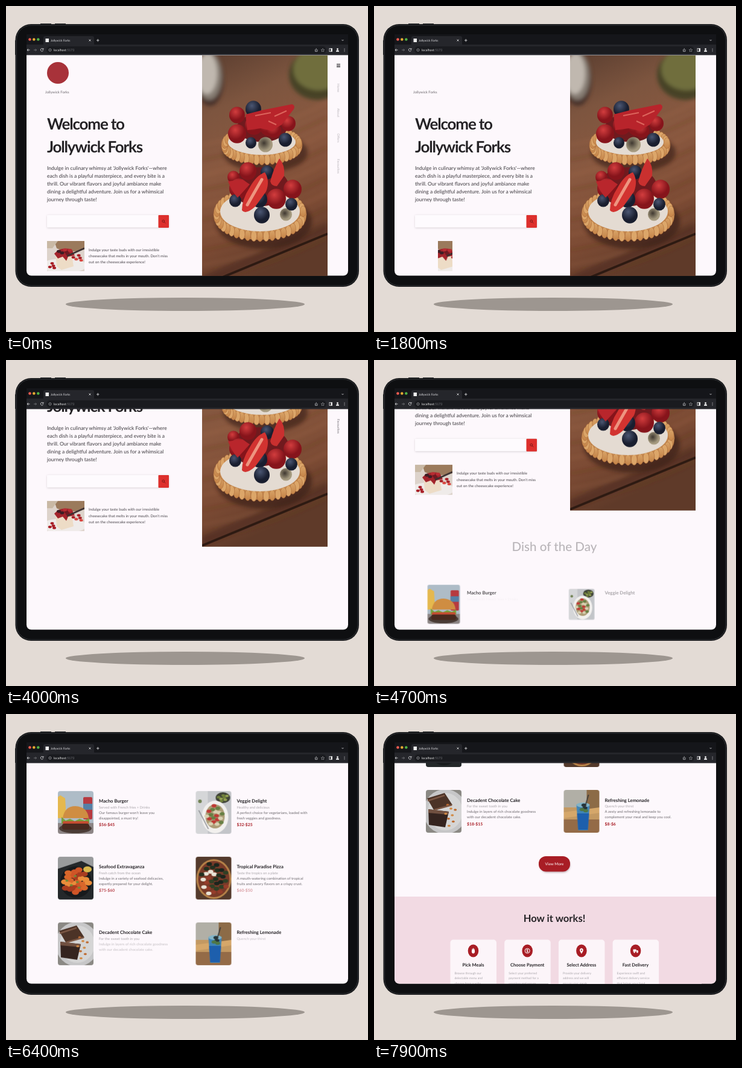
An HTML page that plays this animation: 600 by 541 pixels, repeating every 8 s.

```html
<!DOCTYPE html>
<html lang="en">
<head>
<meta charset="utf-8">
<title>Restaurant page on a tablet</title>
<style>
html, body { margin: 0; width: 100%; height: 100%; overflow: hidden; background: #e3dbd5; }
svg { display: block; width: 100%; height: 100%; }
text { font-family: Lato, "Open Sans", sans-serif; white-space: pre; text-rendering: geometricPrecision; }

.page { animation: scroll 8s linear infinite; }
.logo { animation: logo 8s linear infinite; }
.caption { animation: caption 8s linear infinite; }
.nav { animation: nav 8s linear infinite; }
.slit { animation: slit 8s linear infinite; transform-origin: 130px 0; }
.slide { animation: slide 8s linear infinite; }
/* hidden for two seconds, then shown from --at on */
.appear, .grow { animation: appear 8s linear infinite; animation-delay: calc(var(--at) - 10s); }
.grow { animation-name: grow; }

@keyframes scroll {
  0%, 42% { transform: translateY(0); }
  50% { transform: translateY(-156px); }
  58.75% { transform: translateY(-216px); }
  80% { transform: translateY(-458px); }
  98.75%, 100% { transform: translateY(-678px); }
}
@keyframes logo { 0%, 21.24% { opacity: 1; } 21.25%, 24% { opacity: 0; } 29%, 100% { opacity: 1; } }
@keyframes caption { 0%, 21.24% { opacity: 1; } 21.25%, 25% { opacity: 0; } 31%, 100% { opacity: 1; } }
@keyframes nav { 0% { opacity: .5; } 4%, 21.24% { opacity: 1; } 21.25%, 27% { opacity: 0; } 35%, 100% { opacity: 1; } }
@keyframes slit { 0%, 21.24% { transform: scaleX(1); } 21.25% { transform: scaleX(0); } 24.6%, 100% { transform: scaleX(1); } }
@keyframes slide { 0%, 21.24% { transform: none; } 21.25% { transform: translateX(31px); } 24.6%, 100% { transform: translateX(0); } }
@keyframes appear {
  0% { opacity: 0; }
  25% { opacity: 0; animation-timing-function: ease-out; }
  30%, 100% { opacity: 1; }
}
@keyframes grow {
  0%, 25% { visibility: hidden; transform: scale(.5); animation-timing-function: ease-out; }
  30%, 100% { visibility: visible; transform: scale(1); }
}
</style>
</head>
<body>
<svg viewBox="0 0 600 541" preserveAspectRatio="none">
  <defs>
    <clipPath id="screen"><rect x="34" y="60" width="533" height="387.500" rx="8"/></clipPath>
    <clipPath id="hero"><rect x="325" y="82" width="208" height="384"/></clipPath>
    <clipPath id="thumb"><rect class="slit" x="68" y="390" width="62" height="49.500"/></clipPath>
    <clipPath id="pic"><rect width="59" height="71" rx="4"/></clipPath>
    <linearGradient id="table" x2=".25" y2="1">
      <stop stop-color="#5b3e30"/><stop offset=".25" stop-color="#7d553f"/><stop offset=".5" stop-color="#8a5940"/>
      <stop offset=".8" stop-color="#7c4b34"/><stop offset="1" stop-color="#5f3a29"/>
    </linearGradient>
    <radialGradient id="red" cx=".4" cy=".3"><stop stop-color="#d23d3e"/><stop offset="1" stop-color="#86141b"/></radialGradient>
    <radialGradient id="blue" cx=".4" cy=".3"><stop stop-color="#4b5672"/><stop offset="1" stop-color="#191e2f"/></radialGradient>
    <radialGradient id="grey" cx=".4" cy=".4"><stop stop-color="#3f3830"/><stop offset="1" stop-color="#a59a7f"/></radialGradient>
    <linearGradient id="crust" x2="0" y2="1"><stop stop-color="#d9a468"/><stop offset="1" stop-color="#c68549"/></linearGradient>
    <filter id="soft" x="-30%" y="-30%" width="160%" height="160%"><feGaussianBlur stdDeviation="3"/></filter>
    <filter id="shade" x="-10%" y="-30%" width="120%" height="180%"><feGaussianBlur stdDeviation="1.4"/></filter>
    <filter id="lens"><feGaussianBlur stdDeviation=".7"/></filter>
  </defs>

  <rect width="600" height="541" fill="#e3dbd5"/>
  <ellipse cx="297" cy="495" rx="198" ry="11" fill="#9d9690"/>
  <path d="M57 30h18M81 30h18M16 57v24" stroke="#2c2e31" stroke-width="2"/>
  <rect x="15.500" y="30" width="569.500" height="436" rx="26" fill="#17181a"/>
  <rect x="17.500" y="32" width="565.500" height="432" rx="24" fill="#0e0f11" stroke="#393b3f" stroke-width=".8"/>

  <g clip-path="url(#screen)">
    <rect x="34" y="60" width="533" height="388" fill="#fdf8fc"/>
    <g class="page" id="page"></g>
  </g>

  <g id="chrome">
    <rect x="34" y="47" width="533" height="18" fill="#15161a"/>
    <rect x="34" y="64" width="533" height="17.500" fill="#25262b"/>
    <path d="M60 65q2 0 2-3v-9q0-3 3-3h78q3 0 3 3v9q0 3 2 3z" fill="#25262b"/>
    <circle cx="39.5" cy="55.5" r="2.3" fill="#ee5b50"/>
    <circle cx="46.3" cy="55.5" r="2.3" fill="#e6a932"/>
    <circle cx="53.3" cy="55.5" r="2.3" fill="#4fb046"/>
    <rect x="65.5" y="54" width="5.5" height="6" fill="#eee"/>
    <rect x="67" y="67" width="464" height="12" rx="6" fill="#1a1b1f"/>
    <g fill="none" stroke="#d4d4d6" stroke-width=".9">
      <path d="M137.500 55.500l3 3m0-3l-3 3M150 57h4.500m-2.250-2.250v4.500M556.500 56l1.500 1.500l1.500-1.500"/>
      <path d="M39.500 73h-4.500m2-2l-2 2l2 2"/>
      <path d="M46 73h4.500m-2-2l2 2l-2 2" stroke="#737478"/>
      <path d="M61.500 71.500a2.300 2.300 0 1 0 .3 2M62 70v2h-2"/>
      <circle cx="73" cy="73" r="2" stroke="#98999d"/>
      <path d="M512.500 72v3.500h3.500v-3.500M514.200 74v-4" stroke="#a5a6aa"/>
      <path d="M525 70.500l.8 1.800l2 .2l-1.500 1.300l.5 2l-1.800-1l-1.800 1l.5-2l-1.500-1.300l2-.2z" stroke="#a5a6aa" stroke-width=".6"/>
      <rect x="536" y="70.500" width="4.500" height="5"/>
    </g>
    <path d="M538.500 70.500h2v5h-2z" fill="#eee"/>
    <g fill="#e4e4e6">
      <circle cx="549.500" cy="71.500" r="1.400"/><path d="M547 76q0-3 2.500-3t2.500 3z"/>
      <circle cx="561" cy="71" r=".6"/><circle cx="561" cy="73" r=".6"/><circle cx="561" cy="75" r=".6"/>
    </g>
    <text x="74" y="58.700" font-size="4.900" fill="#e4e4e6">Jollywick Forks</text>
    <text x="79" y="74.800" font-size="5.300" fill="#eee">localhost<tspan fill="#77787d">:5173</tspan></text>
  </g>
</svg>

<script>
const BRAND = "Jollywick Forks";
const DARK = "#252326", GREY = "#6f6b70", PALE = "#aaa6ab", RED = "#a81d25";

const text = (x, y, size, str, color = DARK, more = "") =>
  `<text x="${x}" y="${y}" font-size="${size}" fill="${color}" ${more}>${str}</text>`;
const lines = (x, y, step, size, rows, color, more) =>
  rows.map((row, i) => text(x, y + i * step, size, row, color, more)).join("");
const oval = (x, y, rx, ry, fill, more = "") =>
  `<ellipse cx="${x}" cy="${y}" rx="${rx}" ry="${ry}" fill="${fill}" ${more}/>`;
const box = (x, y, w, h, fill, rx = 0, more = "") =>
  `<rect x="${x}" y="${y}" width="${w}" height="${h}" fill="${fill}" rx="${rx}" ${more}/>`;
const path = (d, fill, more = "") => `<path d="${d}" fill="${fill}" ${more}/>`;
const line = (d, stroke, width, more = "") =>
  `<path d="${d}" fill="none" stroke="${stroke}" stroke-width="${width}" ${more}/>`;
const appear = (at, body) => `<g class="appear" style="--at:${at}ms">${body}</g>`;
const BOLD = 'font-weight="700"', MID = 'text-anchor="middle"';

// scatter small ovals over a disc, golden-angle spacing
function scatter(n, x, y, rx, ry, size, colors) {
  let out = "";
  for (let i = 0; i < n; i++) {
    const r = Math.sqrt((i + .5) / n), a = i * 2.4;
    out += oval((x + rx * r * Math.cos(a)).toFixed(1), (y + ry * r * Math.sin(a)).toFixed(1),
      size, size * .7, colors[i % colors.length]);
  }
  return out;
}

// ridged crust: overlapping lobes around the rim
function rim(x, y, rx, ry, size) {
  let out = "";
  for (let i = 0; i < 44; i++) {
    const a = i / 44 * 2 * Math.PI;
    out += oval((x + rx * Math.cos(a)).toFixed(1), (y + ry * Math.sin(a)).toFixed(1),
      size * .55, size, i % 2 ? "url(#crust)" : "#dca669", 'stroke="#a8693a" stroke-width=".6"');
  }
  return out;
}

function tart(x, y, rx, ry, heap, berries) {
  const fruit = berries.map(([bx, by, r, kind]) => oval(bx, by, r, r * 1.05, `url(#${kind})`)).join("");
  return oval(x + 6, y + 12, rx + 3, ry, "#351d12", 'opacity=".6" filter="url(#soft)"')
    + oval(x, y, rx - 3, ry - 3, "#c88b50") + rim(x, y, rx - 5, ry - 9, 9)
    + oval(x, y - 5, rx - 11, ry - 12, "#e4dbd2")
    + oval(x, heap, rx * .62, ry * .72, "#701a1e") + fruit;
}

function heroPhoto() {
  let grain = "";
  for (let i = 0; i < 10; i++)
    grain += line(`M325 ${230 + i * 25}Q430 ${212 + i * 25} 533 ${160 + i * 25}`, i % 2 ? "#4f2e1e" : "#a8714f", 4, 'opacity=".25"');
  const back = [
    [410, 171, 13, "blue"], [383, 181, 13, "red"], [383, 212, 15, "red"], [411, 198, 15, "red"],
    [436, 199, 16, "red"], [468, 195, 12, "red"], [444, 206, 12, "red"],
    [406, 227, 9, "blue"], [430, 230, 12, "grey"], [463, 222, 11, "blue"]
  ];
  const front = [
    [377, 284, 10, "red"], [401, 274, 14, "red"], [386, 303, 16, "red"], [433, 276, 11, "blue"],
    [475, 304, 15, "red"], [448, 320, 16, "red"], [420, 321, 13, "blue"], [380, 323, 10, "blue"],
    [424, 347, 13, "blue"], [464, 346, 10, "grey"], [473, 329, 10, "blue"]
  ];
  return `<g clip-path="url(#hero)">` + box(325, 82, 208, 384, "url(#table)")
    + `<g filter="url(#soft)">` + grain
    + oval(338, 122, 23, 44, "#4a3329") + oval(337, 116, 21, 40, "#857b72") + oval(333, 112, 17, 34, "#c0b8af")
    + oval(516, 114, 47, 42, "#464325") + oval(518, 105, 42, 35, "#6f6e3c")
    + path("M325 448L533 358V376L325 466z", "#4b2b1d", 'opacity=".55"') + `</g>`
    + `<g filter="url(#lens)">` + line("M325 464L533 378", "#2d1a12", 4)
    + tart(424, 231, 67, 33, 202, back)
    + path("M397 180L424 173L474 163Q482 166 474 175L457 197L440 207L422 203L400 206z", "#b8242b")
    + line("M413 182l26 -5m6 6l20 -9m-30 17l13 6", "#dc655c", 2)
    + tart(421, 346, 77, 45, 300, front)
    + path("M453 253Q463 264 461 282L449 299Q440 299 438 291Q443 271 453 253z", "#c9302f")
    + path("M368 291L392 288L404 296L384 318Q374 308 368 291z", "#b9262c")
    + path("M429 276Q438 290 431 308L413 333Q397 347 391 339Q391 321 404 301Q415 281 429 276z", "#d23330")
    + line("M424 288Q413 307 400 330", "#ee9580", 5, 'stroke-linecap="round"')
    + `</g></g>`;
}

const cheesecake = box(68, 390, 62, 50, "#ddd3cb") + path("M80 390H130V404Q104 412 84 402z", "#9b7a5c")
  + path("M68 390h18l-9 12h-9z", "#c9b9a5") + oval(96, 431, 38, 12, "#efebe9")
  + path("M82 411L108 407L112 432L92 438L84 432z", "#eddcc6")
  + path("M80 411Q90 399 109 404L114 414L103 416L100 423L94 416L86 419z", "#a3232b")
  + scatter(6, 97, 408, 11, 5, 3.5, ["#6e1a22", "#3d1d24", "#b92d33"])
  + line("M130 402L110 411L101 415", "#3b3030", 2.5) + scatter(5, 120, 418, 9, 6, 3, [RED, "#d9453f"])
  + scatter(4, 76, 431, 7, 5, 3, [RED]);

function hero() {
  const nav = [["Home", 136], ["About", 177], ["Offers", 219], ["Favourites", 266]].map(([word, y]) =>
    text(0, 0, 5.4, word, "#77737a", `${MID} transform="translate(548.5 ${y}) rotate(90)"`)).join("");
  return heroPhoto()
    + `<g class="logo">` + oval(86, 111, 18, 18, "#a8323a") + line("M548 96.500h6m-6 2.200h6m-6 2.200h6", DARK, 1.1) + `</g>`
    + text(65, 144.5, 6, BRAND, GREY)
    + lines(68, 204.5, 38, 26, ["Welcome to", BRAND], DARK, `${BOLD} letter-spacing="-1.2"`)
    + lines(68, 272, 13, 8.5, [
      `Indulge in culinary whimsy at '${BRAND}'—where`,
      "each dish is a playful masterpiece, and every bite is a",
      "thrill. Our vibrant flavors and joyful ambiance make",
      "dining a delightful adventure. Join us for a whimsical",
      "journey through taste!"], "#3c393e")
    + box(68, 347.5, 202, 21, "#bdb6bc", 2, 'opacity=".6" filter="url(#shade)"')
    + box(68, 347, 186, 20.5, "#fefbfe", 1) + box(252.5, 347, 17.5, 21, "#dd302d", 1)
    + `<circle cx="260.800" cy="357" r="1.900" fill="none" stroke="#641616" stroke-width=".8"/>`
    + line("M262.200 358.500l2 2", "#641616", .9)
    + `<g clip-path="url(#thumb)"><g class="slide">${cheesecake}</g></g>`
    + `<g class="caption">` + lines(137, 406.5, 10.2, 6.2, [
      "Indulge your taste buds with our irresistible",
      "cheesecake that melts in your mouth. Don't miss",
      "out on the cheesecake experience!"], "#4a474c") + `</g>`
    + `<g class="nav">${nav}</g>`;
}

const photos = {
  burger: box(0, 0, 59, 71, "#aebcc7") + box(0, 53, 59, 18, "#8c8585") + path("M0 10l4-3l8 5l2 33H0z", "#e5b84e")
    + box(42, 10, 15, 37, "#b73a40", 2) + box(42, 21, 15, 10, "#5580a6")
    + oval(29, 62, 27, 8, "#4a3c36") + path("M8 45Q11 25 29 25Q49 26 51 45z", "#cf8d42")
    + path("M6 43l7 6l7-3l8 4l8-4l8 3l8-4v9H6z", "#76a13c") + box(8, 50, 43, 5, "#c64d32", 2) + box(7, 54, 45, 10, "#49291f", 4),
  veggie: box(0, 0, 59, 71, "#c3c5c9") + box(0, 0, 20, 71, "#d5d6d8") + oval(45, 11, 12, 9, "#404338") + scatter(7, 45, 11, 9, 6, 3, ["#71823c", "#93a052"])
    + oval(32, 43, 22, 27, "#f2f0ee") + oval(32, 42, 16, 20, "#ac9c76") + scatter(18, 32, 41, 14, 18, 4, ["#be3b35", "#678044", "#d8d1b2"])
    + line("M5 32l16 31", "#878a8f", 1.5) + oval(7, 17, 3, 3, "#708152"),
  seafood: box(0, 0, 59, 71, "#999b9c") + path("M0 20L39 7L59 17V71H0z", "#24282a") + oval(30, 42, 26, 26, "#171a1c")
    + scatter(24, 30, 41, 22, 20, 6, ["#d9672b", "#ea8d3b", "#a83c20", "#cf5527"]) + scatter(5, 28, 42, 14, 14, 2.5, ["#708a36"])
    + oval(49, 21, 7, 5, "#d9b84c"),
  pizza: box(0, 0, 59, 71, "#543a2c") + oval(30, 37, 29, 33, "#b78349") + oval(30, 37, 26, 30, "#783a29")
    + scatter(30, 30, 37, 23, 27, 4.5, ["#22301f", "#304025", "#eae4d7", "#1b251d", "#953d2b"]),
  cake: box(0, 0, 59, 71, "#8b8984") + oval(32, 36, 36, 37, "#c6c6c7") + oval(32, 36, 29, 31, "#d5d5d5")
    + path("M2 14L31 5L44 25L13 33z", "#4c3327") + path("M4 32L38 36L32 62L5 58z", "#35241f") + path("M4 32L38 36L37 41L4 38z", "#715040")
    + scatter(8, 41, 42, 11, 20, 2.5, ["#d18a45", "#bd6a30"]) + line("M3 18L31 9M14 33L43 25", "#7c5744", 2.5),
  lemonade: box(0, 0, 59, 71, "#c39962") + box(0, 0, 59, 29, "#b1afa6") + box(38, 0, 21, 36, "#8c6b47") + path("M0 49h59v22H0z", "#946b47")
    + path("M0 37L59 29V38L0 47z", "#d5a76a") + path("M21 24H43L40 67H24z", "#3f84b7") + path("M22 39H42L40 66H24z", "#1d5fad")
    + oval(32, 25, 11, 4, "#83b4c7") + scatter(4, 33, 30, 6, 6, 4, ["#25353a", "#4f7746"]) + line("M35 29L41 8", "#2f3235", 1.5)
};

function dish(pic, x, y, at, title, sub, desc, price) {
  const tx = x + 68, step = 240;
  return `<g class="grow" style="--at:${at}ms;transform-origin:${x + 29.5}px ${y + 35.5}px">`
    + `<g transform="translate(${x} ${y})" clip-path="url(#pic)">${photos[pic]}</g></g>`
    + appear(at + 20, text(tx, y + 19.5, 7.7, title, DARK, BOLD))
    + appear(at + step, text(tx, y + 29, 5.8, sub, PALE))
    + appear(at + 2 * step, lines(tx, y + 38, 9.3, 6, desc, GREY))
    + appear(at + 3 * step, text(tx, y + 58.5, 6.8, price, RED, BOLD));
}

const menu = [
  ["burger", "Macho Burger", "Served with French fries + Drinks", ["Our famous burger won't leave you", "disappointed, a must try!"], "$56-$45"],
  ["veggie", "Veggie Delight", "Healthy and delicious", ["A perfect choice for vegetarians, loaded with", "fresh veggies and goodness."], "$32-$25"],
  ["seafood", "Seafood Extravaganza", "Fresh catch from the ocean", ["Indulge in a variety of seafood delicacies,", "expertly prepared for your delight."], "$75-$60"],
  ["pizza", "Tropical Paradise Pizza", "Taste the tropics on a plate", ["A mouth-watering combination of tropical", "fruits and savory flavors on a crispy crust."], "$60-$50"],
  ["cake", "Decadent Chocolate Cake", "For the sweet tooth in you", ["Indulge in layers of rich chocolate goodness", "with our decadent chocolate cake."], "$18-$15"],
  ["lemonade", "Refreshing Lemonade", "Quench your thirst", ["A zesty and refreshing lemonade to", "complement your meal and keep you cool."], "$8-$6"]
];

function dishes() {
  const rowStart = [4440, 5430, 5820];
  const heading = appear(4620, text(299, 533, 20.6, "Dish of the Day", DARK, `${MID} font-weight="500"`));
  return heading + menu.map(([pic, ...rest], i) => {
    const row = i >> 1, col = i % 2;
    return dish(pic, 86 + col * 228.5, 586 + row * 109, rowStart[row] + col * 140, ...rest);
  }).join("");
}

const stages = [
  ["Pick Meals", ["Browse through our", "delectable menu and", "choose from a wide"]],
  ["Choose Payment", ["Select your preferred", "payment method for a", "seamless and secure"]],
  ["Select Address", ["Provide your delivery", "address and we will", "ensure your meals"]],
  ["Fast Delivery", ["Experience swift and", "efficient delivery service", "that brings your food"]]
];
const icons = [
  oval(0, 1, 2.6, 3.4, "#fff") + line("M-1.500 -3.500v4m1.500 -5v4m1.500 -3v4", "#fff", 1),
  `<circle r="4" fill="none" stroke="#fff"/>` + line("M1.500 -1.500h-3l3 3h-3M0 -3v6", "#fff", .8),
  path("M0 5Q-6 -3 0 -4.500Q6 -3 0 5z", "#fff") + oval(0, -1, 1.1, 1.1, RED),
  path("M-4 -2.500h5v4h-5zM1.500 -1h2l1 2v.8h-3z", "#fff") + oval(-2, 2.4, 1.2, 1.2, "#fff") + oval(2.8, 2.4, 1.2, 1.2, "#fff")
];

function howItWorks() {
  const cards = stages.map(([title, rows], i) => {
    const x = 126.5 + i * 89.7, mid = x + 38;
    return box(x, 1052.5, 76.5, 105, "#fcf5f9", 5)
      + oval(mid, 1071, 8.8, 10.5, RED) + `<g transform="translate(${mid} 1071)">${icons[i]}</g>`
      + text(mid, 1096.8, 7.5, title, DARK, `${MID} ${BOLD}`)
      + lines(x + 7, 1109.7, 8.6, 5.1, rows, PALE);
  }).join("");
  return box(275, 917, 50, 24, "#bba4aa", 12, 'filter="url(#shade)"') + box(273, 914, 52, 25.5, RED, 12)
    + text(299, 929.2, 6.4, "View More", "#fff", MID)
    + box(34, 981, 533, 200, "#f2dae3")
    + text(299, 1022.5, 16.6, "How it works!", DARK, `${MID} ${BOLD}`) + cards;
}

document.getElementById("page").innerHTML = hero() + dishes() + howItWorks();
</script>
</body>
</html>
```
